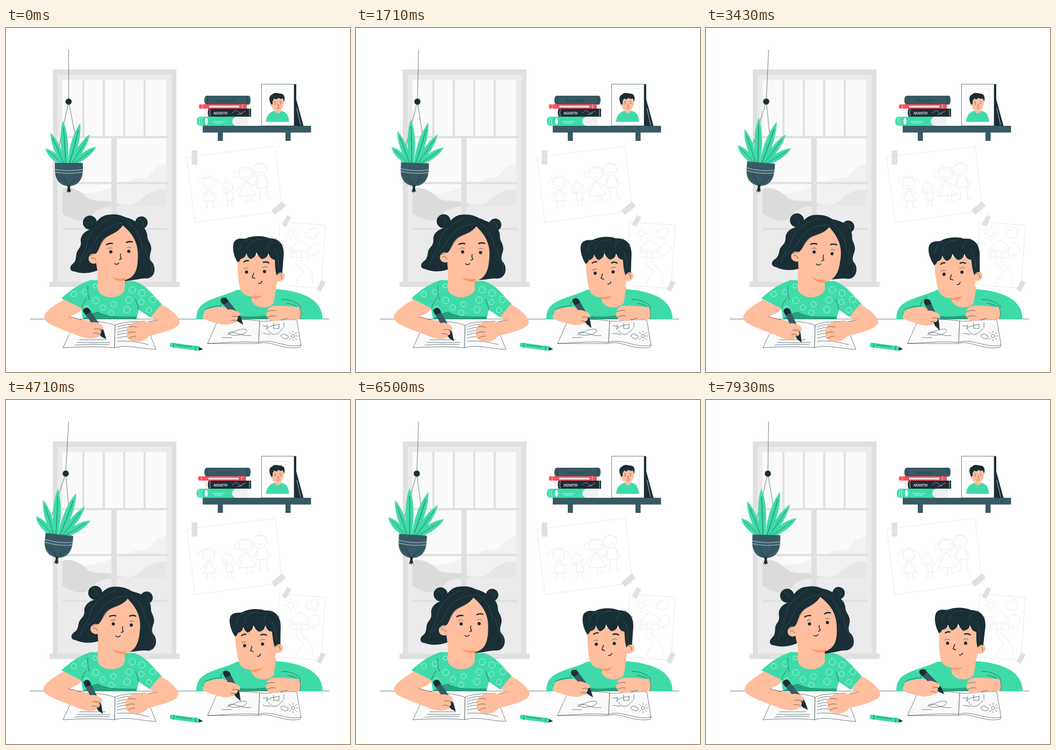
Recreate the animation shown at these times as an HTML page without scripts. Size 640 px wide and 640 px high, loop 8 s.

```html
<!DOCTYPE html>
<html lang="en">
<head>
<meta charset="utf-8">
<title>Homework</title>
<style>
@property --nod { syntax: "<number>"; inherits: true; initial-value: 0; }
@property --swing { syntax: "<number>"; inherits: true; initial-value: 0; }
@property --grow { syntax: "<number>"; inherits: true; initial-value: 0; }
html, body { margin: 0; width: 100%; height: 100%; overflow: hidden; background: #fff; }
svg { display: block; width: 100vw; height: 100vh; animation: nod 8s linear infinite, swing 8s linear infinite, grow 8s linear infinite; }

.skin { fill: #ffbe9d; } .green { fill: #3edba9; } .dark { fill: #1a2e35; } .slate { fill: #375a64; }
.shade { fill: #2b9f7d; } .blush { fill: #ff9767; } .tape { fill: #e0e0e0; }
.ink, .doodle, .wave, .white { fill: none; stroke-linecap: round; stroke-linejoin: round; }
.ink { stroke: #1a2e35; stroke-width: .6; }
.bold { stroke-width: 1.5; }
.brow { stroke-width: 2.4; }
.wave { stroke: #46606a; stroke-width: .6; }
.white { stroke: #fff; stroke-width: .7; }
.doodle { stroke: #e0e0e0; stroke-width: .7; }
.page { fill: #fafafa; stroke: #1a2e35; stroke-width: .6; stroke-linejoin: round; }

.rope { transform-origin: 116.5px 41px; transform: rotate(calc(var(--swing) * 3.3deg)); }
.basket { transform-origin: 116.5px 137px; transform: rotate(calc(var(--swing) * 2.9deg)); }
.leaves { transform-origin: 117px 251px; transform: scale(calc(1 + var(--grow) * .1)); }
.girl-head { transform-origin: 196px 466px; transform: rotate(calc(var(--nod) * 7.2deg)); }
.girl-lock { transform-origin: 255px 490px; transform: rotate(calc(var(--nod) * 5deg)); }
.girl-pen { transform-origin: 147px 542px; transform: rotate(calc(var(--nod) * 10deg)); }
.girl-hand { transform-origin: 140px 550px; transform: rotate(calc(var(--nod) * 5deg)); }
.girl-left { transform: translateX(calc(var(--nod) * -1.7px)); }
.girl-right { transform: translateX(calc(var(--nod) * -2.8px)); }
.boy-head { transform-origin: 495px 512px; transform: rotate(calc(var(--nod) * -4.8deg)); }
.boy-pen { transform-origin: 398px 531px; transform: rotate(calc(var(--nod) * 15deg)); }
.boy-hand { transform-origin: 385px 533px; transform: rotate(calc(var(--nod) * 4deg)); }
.boy-right { transform: translateX(calc(var(--nod) * -1px)); }
.low-book { animation: low 8s ease-in-out infinite; }
.red-book { animation: red 8s ease-in-out infinite; }

@keyframes nod {
  0% { --nod: 0; } 13.4% { --nod: .34; } 30.4% { --nod: .76; } 37.5% { --nod: .92; } 43.8% { --nod: 1; }
  50% { --nod: .95; } 58.9% { --nod: .75; } 68.8% { --nod: .46; } 81.3% { --nod: .1; } 100% { --nod: -.42; }
}
@keyframes swing {
  0% { --swing: 0; } 13.4% { --swing: .25; } 30.4% { --swing: .58; } 42.9% { --swing: .81; } 51% { --swing: .96; }
  57% { --swing: 1.01; } 68.8% { --swing: .85; } 81.3% { --swing: .61; } 100% { --swing: .24; }
}
@keyframes grow {
  0% { --grow: 0; } 30.4% { --grow: .4; } 58.9% { --grow: .77; } 81.3% { --grow: 1; } 100% { --grow: .9; }
}
@keyframes low { 0%, 32% { transform: none; } 44% { transform: translateX(-3px); } 65%, 100% { transform: none; } }
@keyframes red { 0%, 46% { transform: none; } 58% { transform: translateX(-1.6px); } 72%, 100% { transform: none; } }
</style>
</head>
<body>
<svg viewBox="0 0 640 640">
  <defs>
    <g id="leaf">
      <path class="green" d="M-3.500 0C-9 -35 -7 -60 0 -80C7 -60 9 -35 3.500 0z"/>
      <path class="ink" d="M0 0Q1 -36 0 -66"/>
    </g>
  </defs>

  <!-- window -->
  <g>
    <path fill="#e0e0e0" d="M87 77H317V473H87z"/>
    <path fill="#ebebeb" d="M96 87H308V473H96z"/>
    <path fill="#fafafa" d="M105 97H298V460H105z"/>
    <path fill="#f1f1f1" d="M105 300C150 312 170 308 206 292C228 290 232 278 252 279C272 281 268 258 298 253V460H105z"/>
    <path fill="#e6e6e6" d="M170 335C190 318 205 326 220 329C250 336 255 297 298 301V460H170z"/>
    <path fill="#dcdcdc" d="M105 299C130 292 146 312 155 318C174 326 190 316 211 330C190 333 180 330 165 343C150 366 130 360 105 346z"/>
    <path fill="#ebebeb" d="M105 347C130 360 150 366 165 344C180 330 196 334 212 331L298 330V460H105z"/>
    <path fill="#e0e0e0" d="M142 97h4V202h-4zM180 97h4V202h-4zM218 97h4V202h-4zM256 97h4V202h-4zM105 201H301v4H105zM196 205h10V460h-10zM105 286.500H301v4H105zM105 372H301v4H105zM81 472H323v10H81z"/>
  </g>

  <!-- shelf -->
  <path class="slate" d="M366 182H567.500V194.500H366zM394 194h9.500v16h-9.500zM520 194h9.500v16h-9.500z"/>
  <path class="slate" d="M373 126H452Q455 127 455 134T452 142.500H373Q369 142 369 134.500T373 126z"/>
  <path class="ink" d="M376 126Q373 134 376 142M448 126Q452 134 448 142M392 134H405M409 134H426M392 137H420"/>
  <g class="red-book">
    <path fill="#ff4f5b" d="M361 142H448V150H361Q359 150 359 146T361 142z"/>
    <path fill="#ffd9dc" d="M378 144.500H434V148H378z"/>
    <path class="white" d="M365 142V150M440 142V150"/>
  </g>
  <path fill="#f2f2f2" d="M371 150.500H380V165H371Q368 158 371 150.500z"/>
  <path class="dark" d="M377 150H456V165H377Q374 158 377 150z"/>
  <path class="white" d="M380 151Q378 158 380 164M453 151V164"/>
  <path class="white" stroke-dasharray="1 1.500" d="M421 158L428 153L436 159L446 154M431 161L440 159"/>
  <text x="386" y="160.800" fill="#fff" font-family="'Open Sans', sans-serif" font-size="7" font-weight="600" font-style="italic">NOVETH</text>
  <g class="low-book">
    <path fill="#f0f0f0" d="M421 166H450V181.500H421z"/>
    <path class="green" d="M360 165H428Q421 168 421 174T428 182H360Q355 181 355 173.500T360 165z"/>
    <ellipse cx="373" cy="173.500" rx="2.700" ry="6.500" fill="#fff"/>
    <path class="white" d="M361 166Q358 173 361 181M384 174H407M388 177H403M365 166Q362 173 365 181"/>
  </g>

  <!-- framed portrait -->
  <path class="dark" d="M535 104.500H540V182H535zM540 133L553.500 182H540z"/>
  <path class="white" d="M541 149L548 180"/>
  <path fill="#fff" stroke="#1a2e35" stroke-width=".6" d="M475.500 104.500H536V182H475.500z"/>
  <path fill="#fff" stroke="#dcdcdc" stroke-width=".6" d="M484 113H527.500V174.500H484z"/>
  <path class="green" d="M484 174.500C485 160 492 157 499 154H512C522 156 526 163 526.500 174.500z"/>
  <path class="skin" d="M494 133L496 151L500 152V155Q506 162 512 155V151Q518 146 517.500 132Q505 124 494 133z"/>
  <circle class="skin" cx="494.500" cy="143" r="2.600"/>
  <path class="dark" d="M493 142C488 132 490 125 495 124C498 119 506 121 509 122C517 121 520 128 517.500 137L515 131L511 132L507 130L503 133L499 131L496 136V142z"/>
  <path class="ink" d="M499 137.500h3M509 137h3M506 141l1.500 4-2 .5M504 149q3 1 5-1"/>
  <g class="dark"><circle cx="501" cy="141" r=".8"/><circle cx="511" cy="140.500" r=".8"/></g>

  <!-- drawings on the wall -->
  <path class="doodle" d="M336.500 240L501 220L514 340L352 362zM509.500 360.500L594 367L586 484L503 478z"/>
  <g class="doodle">
    <circle cx="377" cy="289" r="11"/><path d="M357 289Q360 278 370 279Q380 270 388 281Q396 280 398 290M373 286v1M381 286v1M372 292q5 5 9 0M377 300L367 323L391 321zM374 304L363 313M380 303L393 309M374 323l1 11h-5M384 322l1 11h5"/>
    <circle cx="412" cy="297" r="10"/><path d="M410 287q-3-5 3-5M408 295v1M416 294v1M407 300q5 5 9 0M411 307L410 320H423L420 307M410 310L401 304M421 310L430 302M413 320v11h-4M420 320v11h5"/>
    <circle cx="446" cy="272" r="12"/><path d="M433 276Q423 282 425 272Q424 266 433 268Q434 256 446 259Q458 256 459 268Q464 268 461 277M442 269v1M450 268v1M440 276q6 6 11 0M446 284L432 313L466 310zM443 288L430 300M450 288L466 293M450 312v12h-4M457 311v11h5"/>
    <circle cx="473" cy="263" r="12"/><path d="M462 258Q470 246 484 256M469 261v1M477 260v1M468 267q6 5 10-1M469 275L466 298L489 295L482 274M467 281L461 292M484 279L492 290M472 297L474 319h-6M484 296L487 318h6"/>
    <circle cx="530" cy="382" r="6"/><path d="M530 372v-4M530 392v4M520 382h-4M540 382h4M523 375l-3-3M537 375l3-3M523 389l-3 3M537 389l3 3"/>
    <path d="M525 412L547 394L568 410M530 408L528 426L563 428L564 408M541 427V414H549V427M533 412h5v6h-5zM554 412h6v6h-6z"/>
    <path d="M565 390Q555 388 559 380Q562 373 567 377Q574 366 579 374Q584 382 578 384Q580 392 570 391zM568 403Q576 395 581 404Q588 410 581 417Q574 426 567 420M571 422V428M544 430Q532 440 548 446Q560 454 545 464L540 476M552 430Q545 438 560 445Q574 455 570 478"/>
  </g>
  <g class="tape">
    <path d="M345.500 228h10.500v26h-10.500z"/>
    <path transform="rotate(-40 507 335)" d="M494 329.500h26v11h-26z"/>
    <path transform="rotate(28 522 359)" d="M517.500 349h9v20h-9z"/>
    <path transform="rotate(27 586 480)" d="M581.500 470h9v20h-9z"/>
  </g>

  <!-- hanging plant -->
  <g class="rope">
    <path class="ink" d="M116.500 41V137"/>
    <g class="basket">
      <path class="ink" d="M116.500 137L92 251M116.500 137L139 251"/>
      <circle class="dark" cx="116.500" cy="137" r="5.800"/>
      <g class="leaves">
        <use href="#leaf" transform="translate(104 252) rotate(-48) scale(.9 .52)"/>
        <use href="#leaf" transform="translate(107 252) rotate(-23) scale(.9 .78)"/>
        <use href="#leaf" transform="translate(126 252) rotate(53.500) scale(.9 .65)"/>
        <use href="#leaf" transform="translate(122 252) rotate(32) scale(.9 .8)"/>
        <use href="#leaf" transform="translate(111 252) rotate(-3.600)"/>
        <use href="#leaf" transform="translate(118 252) rotate(15) scale(1 .97)"/>
      </g>
      <path class="slate" d="M91 251H143V264C143 284 132 294 117 294S91 284 91 264z"/>
      <path class="white" d="M91 263Q117 268 143 263M91 268Q117 273 143 268"/>
      <path class="ink" d="M94 273L117 294L140 273M102 271Q112 287 117 294Q124 284 132 271"/>
      <path class="dark" d="M114 293h6l-1 4 2 8-2-1-2 3-1-3-3 2 2-9z"/>
    </g>
  </g>

  <path class="ink" d="M45 541.500H601"/>

  <!-- girl -->
  <path class="green" d="M157 469C134 477 118 489 103 503L140 522L143 541H243L247 524L269 539L290 514C274 497 260 477 238 471z"/>
  <path class="shade" d="M143 541C155 534 165 527 172 528C190 539 220 536 243 537V542H143z"/>
  <g fill="none" stroke="#d8f8ed" stroke-width=".8">
    <circle cx="126" cy="495" r="5"/><circle cx="147" cy="491" r="5"/><circle cx="167" cy="507" r="6"/><circle cx="150" cy="521" r="4"/><circle cx="180" cy="520" r="5"/>
    <circle cx="200" cy="514" r="5"/><circle cx="196" cy="530" r="5"/><circle cx="225" cy="524" r="6"/><circle cx="229" cy="506" r="6"/><circle cx="235" cy="487" r="6"/>
    <circle cx="253" cy="493" r="6"/><circle cx="252" cy="510" r="5"/><circle cx="273" cy="505" r="6"/><circle cx="266" cy="525" r="5"/><circle cx="166" cy="480" r="4"/>
  </g>
  <path class="ink" d="M152 480Q151 494 155 505M140 522Q144 510 150 503M247 524Q246 515 241 505"/>
  <g class="girl-lock">
    <path class="dark" d="M225 358C248 360 263 372 263 388C263 396 272 402 270 414C267 424 266 431 272 436C279 444 279 464 262 466C250 465 240 470 219 471L210 430z"/>
    <path class="wave" d="M247 372C264 390 254 410 263 422C267 436 276 442 271 454"/>
  </g>
  <path class="skin" d="M171 440V487C177 505 213 506 221 487V455z"/>
  <g class="girl-head">
    <circle class="dark" cx="156" cy="362" r="13"/><circle class="dark" cx="252" cy="362" r="11.500"/>
    <path class="wave" d="M149 354q10 2 12 13M246 356q9 0 10 11"/>
    <path class="ink" stroke="#3edba9" d="M161 375q6-2 8-7M241 365q2 7 8 9"/>
    <path class="dark" d="M195 347C175 347 168 361 159 374C148 377 138 385 139 397C141 409 133 411 131 420C130 428 130 434 125 438C117 444 118 453 128 453C140 458 162 457 178 447L245 420L263 398C262 376 247 358 222 352C212 347 204 346 195 347z"/>
    <circle class="skin" cx="163" cy="429" r="9.500"/>
    <path class="skin" d="M217 367C208 382 192 383 183 392C172 403 174 417 165 421L171 458C184 469 206 472 221 469C238 465 244 452 245 434C247 408 243 389 217 367z"/>
    <path class="blush" d="M196 463C206 467 214 467 223 465L221 470C212 472 203 470 196 463z"/>
    <path class="ink" d="M158 428q6-3 9 4M217 367C206 383 193 383 184 392C173 404 175 417 156 424"/>
    <path class="wave" d="M216 363C190 365 173 381 166 397C160 412 150 418 142 433M194 354C172 364 154 380 151 400C150 414 139 421 136 444M222 360C241 370 250 385 254 407"/>
    <path class="ink brow" d="M187 403Q192 400 198 401M224 399Q230 396 235 398"/>
    <path class="ink bold" d="M213 420q-1 6 2 9l-4 2M202 438q4 4 8-1"/>
    <path class="ink" d="M190 411q4-4 8-1M225 409q4-3 8 0"/>
    <circle class="dark" cx="195" cy="416.500" r="3"/><circle class="dark" cx="228.500" cy="415.500" r="3"/>
    <g class="blush"><circle cx="184" cy="428" r=".6"/><circle cx="189" cy="431" r=".6"/><circle cx="194" cy="428" r=".6"/><circle cx="229" cy="426" r=".6"/><circle cx="235" cy="428" r=".6"/><circle cx="239" cy="424" r=".6"/></g>
  </g>
  <path class="page" d="M128 547C155 544 185 546 203 553L202 595C175 592 140 593 106 595z"/>
  <path class="page" d="M203 553C218 545 238 548 258 545L279 598C250 597 224 588 202 595z"/>
  <path class="ink" d="M137 580H185M132 585H194M128 590Q160 587 192 589M207 556q20-7 32-4M207 561q16-6 26-4M207 566q12-4 20-3M207 571q10-4 17-3M207 577q12-4 20-2M207 583q25-3 58 6"/>
  <g class="girl-left">
    <path class="skin" d="M108 505C90 516 70 528 71 540C73 552 110 562 138 574L152 545L118 537C130 532 138 528 142 522z"/>
    <path class="ink" d="M118 537L140 543"/>
    <path class="skin girl-hand" d="M134 546C148 540 158 545 168 548C179 551 183 557 178 562C181 568 177 573 170 575C160 580 146 577 134 572z"/>
    <g class="girl-pen">
      <path class="slate" d="M144 528Q142 523 147.500 521T155.500 524L181 561L173 568z"/>
      <path class="dark" d="M144 528Q142 523 147.500 521T155.500 524L158 528L148 534zM177 574L173 568L181 561L183 567L186.500 579z"/>
    </g>
    <g class="girl-hand">
      <path class="skin" d="M152 551C160 545 170 547 177 551C183 556 181 562 175 562C180 567 175 572 168 570L152 566z"/>
      <path class="ink" d="M178 561q-7-3-14-1M173 569q-5-3-11-1"/>
    </g>
  </g>
  <g class="girl-right">
    <path class="skin" d="M289 514C309 524 323 538 323 548C321 560 290 567 266 573C258 585 236 587 229 579C223 576 224 570 226 568C222 561 225 556 229 554C234 545 250 547 260 547L283 543L269 538z"/>
    <path class="ink" d="M226 568q7-4 15-2M229 577q6-4 13-4M229 556q8-2 14 1M283 543l-16 3"/>
  </g>

  <!-- loose marker -->
  <g transform="rotate(7.500 335 593)">
    <path class="green" d="M308 589H359V597.500H308Q304.500 597 304.500 593T308 589z"/>
    <path class="dark" d="M359 590L367 593.500L359 597z"/>
    <path class="ink" d="M312 589V597.500M353 589V597.500M317 592H345"/>
  </g>

  <!-- boy -->
  <path class="green" d="M430 487C410 497 386 501 370 511C358 518 354 528 354 542H589C589 524 580 507 555 497C538 490 520 487 503 486z"/>
  <path class="shade" d="M412 542C420 531 428 536 440 536C460 539 480 533 490 536V542z"/>
  <path class="ink" d="M411 500Q396 510 400 521M370 524Q384 517 398 517M366 532Q372 525 380 524M513 505Q535 504 549 519M523 512Q538 514 547 523M411 530q8 5 20 4"/>
  <path class="skin" d="M457 485L457 508C465 523 489 523 498 512L503 480z"/>
  <g class="boy-head">
    <circle class="skin" cx="509" cy="462" r="9.500"/>
    <path class="skin" d="M431 421C431 448 431 475 437 488C444 503 466 500 481 497C497 494 505 480 505 466L508 425z"/>
    <path class="blush" d="M453 499C463 500 470 499 477 497C471 505 461 505 453 499z"/>
    <path class="dark" d="M431 436C421 420 420 400 427 395C436 389 441 394 448 391C458 386 480 386 489 391C510 391 520 405 516 430L514 456C508 453 505 458 504 461C500 451 501 440 500 431C493 431 490 424 488 419C487 426 482 429 476 430C470 426 468 421 466 417C465 425 460 428 455 430C450 427 449 423 447 419C446 426 441 429 437 429Q435 434 431 436z"/>
    <path class="wave" d="M435 412C436 400 444 395 453 393M449 411C450 398 463 392 476 393M487 410C486 400 491 397 496 396M501 413Q508 425 507 447"/>
    <path class="ink" d="M500 402Q506 399 502 391M502 404Q509 399 516 404M507 457q7 0 6 9M442 448q4-3 9-1M477 446q4-3 9-1"/>
    <path class="ink brow" d="M443 435Q447 432 451 433M479 436Q485 434 489 437"/>
    <path class="ink bold" d="M461 456L458 464L463 466M470 475q5 1 6-4"/>
    <circle class="dark" cx="447.500" cy="454" r="3"/><circle class="dark" cx="481" cy="453" r="3"/>
  </g>
  <path class="page" d="M393 546C420 540 450 542 472 545L470 585C440 582 405 586 375 587z"/>
  <path class="page" d="M472 545C490 547 515 541 541 543L549 590C520 597 495 576 470 585z"/>
  <path class="ink" d="M375 587L470 587C492 580 514 600 547 594L549 590M412 571C432 559 452 557 447 565C440 574 412 573 414 567C424 562 438 575 456 572M402 576H420M486 552v8M484 561C487 553 503 553 508 551M488 562Q499 580 515 559M498 549v10H508V551M517 548v9M478 554l8 1M478 568l14 2"/>
  <path class="ink" d="M514 576Q508 571 515 570Q519 567 521 572Q527 571 524 577Q519 580 514 576M537 573a3 3 0 1 1-6 0a3 3 0 1 1 6 0M534 567v-3M534 579v3M540 573h3M538 569l3-3M538 577l3 3M530 569l-3-3M530 577l-3 3"/>
  <g>
    <path class="skin" d="M372 524C386 520 398 518 406 519L408 552C392 550 377 546 366 540Q366 530 372 524z"/>
    <path class="skin boy-hand" d="M392 520C406 517 420 522 430 527C437 530 437 535 434 538C436 545 428 548 422 549C412 554 399 552 388 547z"/>
    <g class="boy-pen">
      <path class="slate" d="M400 509Q398 503 403.500 502T411 504L435 534L427 541z"/>
      <path class="dark" d="M400 509Q398 503 403.500 502T411 504L414 508L405 515zM431 546L427 541L435 534L437 539L441.500 552z"/>
    </g>
    <g class="boy-hand">
      <path class="skin" d="M408 526C415 521 424 524 431 528C437 531 436 536 431 537C433 543 427 546 421 544L408 540z"/>
      <path class="ink" d="M433 537q-7-2-12 0M428 545q-5-3-9-1"/>
    </g>
  </g>
  <g class="boy-right">
    <path class="skin" d="M546 519C530 519 515 515 503 517C493 516 486 521 486 527C482 533 485 537 487 539C490 547 505 546 512 543L547 542Q551 530 546 519z"/>
    <path class="ink" d="M486 528q7-4 15-2M487 538q8-4 15-2M546 519Q551 531 547 541M512 543L524 540"/>
  </g>
</svg>
</body>
</html>
```
